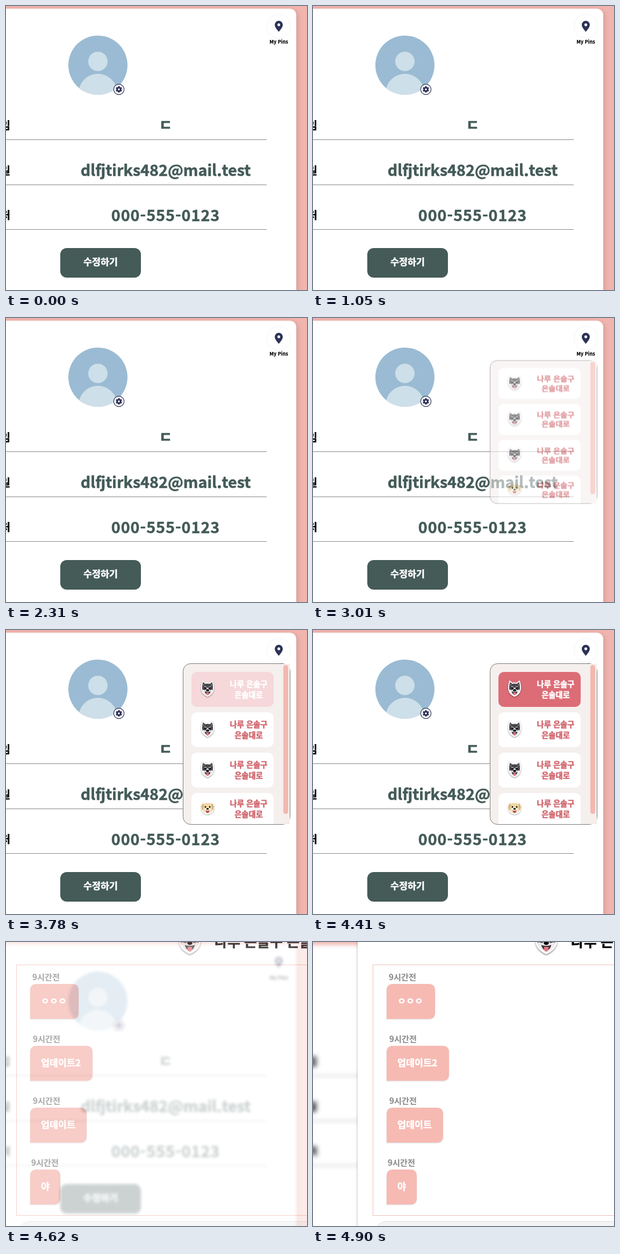
Animation of 560x528 px, one loop 6230 ms. Source, as an HTML page:

```html
<!DOCTYPE html>
<html lang="ko">
<head>
<meta charset="utf-8">
<title>My Pins</title>
<style>
  html, body { margin: 0; width: 100%; height: 100%; overflow: hidden; background: #f2b5ae; }
  svg { display: block; width: 560px; height: 528px; overflow: hidden; }
  text {
    font: 700 16px "Noto Sans CJK KR", "Noto Sans CJK", "Noto Sans", sans-serif;
    fill: currentColor; stroke: currentColor; stroke-width: .5px; stroke-linejoin: round;
  }
  .mid { text-anchor: middle; }
  .end { text-anchor: end; }
  .heavy { font-weight: 900; }
  .value { color: #445b58; font-size: 28.7px; stroke-width: .6px; }
  .label { color: #000; font-size: 19px; font-weight: 900; }
  .address { color: #d1646c; font-size: 14.3px; }
  .time { color: #8f8f8f; font-size: 15.2px; stroke-width: .2px; }
  .bubble { color: #fff; font-size: 17.4px; font-weight: 900; }

  .profile, .list, .chat, .tint, .picked { animation: 6230ms step-end infinite; }
  .profile { animation-name: blur; }
  .list { animation-name: list; transform-origin: 429px 212px; }
  .chat { animation-name: chat; }
  .tint { animation-name: tint; }
  .picked { animation-name: picked; }

  @keyframes list {
    0%, 22.44% { opacity: 0; transform: scaleY(.725); animation-timing-function: steps(5, start); }
    28.06%, 34.8% { opacity: 1; transform: none; animation-timing-function: steps(3, start); }
    38.17%, 46.03% { opacity: 0; transform: scaleY(.725); animation-timing-function: steps(5, start); }
    51.65%, 71.88% { opacity: 1; transform: none; animation-timing-function: steps(3, start); }
    75.25%, 100% { opacity: 0; transform: scaleY(.725); }
  }
  @keyframes tint {
    0% { opacity: 0; }
    60.64% { opacity: .27; }
    61.76% { opacity: .68; }
    62.89% { opacity: .9; }
    64.01%, 100% { opacity: 1; }
  }
  @keyframes picked {
    0% { color: #d1646c; }
    60.64%, 100% { color: #fff; }
  }
  @keyframes blur {
    0% { filter: none; }
    71.88% { filter: blur(1px); }
    73% { filter: blur(2px); }
    74.12% { filter: blur(2.5px); }
    75.25% { filter: blur(3px); }
    76.37%, 100% { filter: blur(4px); }
  }
  @keyframes chat {
    0% { opacity: 0; transform: translateX(-340px); }
    71.88% { opacity: .2; transform: translateX(-272px); }
    73% { opacity: .47; transform: translateX(-180px); }
    74.12% { opacity: .73; transform: translateX(-92px); }
    75.25% { opacity: .9; transform: translateX(-34px); }
    76.37% { opacity: 1; transform: translateX(-10px); }
    77.49% { opacity: 1; transform: translateX(-3px); }
    78.62%, 100% { opacity: 1; transform: none; }
  }
</style>
</head>
<body>
<svg viewBox="0 0 560 528">
  <defs>
    <clipPath id="avatarClip"><circle cx="171" cy="110" r="55"/></clipPath>
    <clipPath id="listClip"><rect x="330" y="63" width="198" height="298" rx="13"/></clipPath>
    <g id="husky">
      <path d="M-9-14L-4-10Q0-11 4-10L9-14Q12-5 10.500 3Q9 10 0 14Q-9 10-10.500 3Q-12-5-9-14Z"
        fill="#48474d" stroke="#fff" stroke-width="2" stroke-linejoin="round" style="filter:drop-shadow(0 1px 1px #0007)"/>
      <path d="M-10 3Q-8 1-5 3Q-2 2 0-3Q2 2 5 3Q8 1 10 3Q8 10 0 13Q-8 10-10 3Z" fill="#eeebea"/>
      <path d="M-8-10L-6-7L-8-5ZM8-10L6-7L8-5Z" fill="#8c7f82"/>
      <path d="M-6-4L-2-2.500M6-4L2-2.500" stroke="#eeebea" stroke-width="1.300"/>
      <circle cx="-4.300" cy="-1.200" r="1.500"/><circle cx="4.300" cy="-1.200" r="1.500"/>
      <ellipse cy="3" rx="2.800" ry="2"/>
      <path d="M-5.500 5Q0 7 5.500 5Q4.500 10 0 11.500Q-4.500 10-5.500 5Z" fill="#39313a"/>
      <path d="M-2.500 7H2.500Q3 12 0 12Q-3 12-2.500 7Z" fill="#e5727e"/>
    </g>
    <g id="retriever">
      <path d="M-8-9Q0-12 8-9Q13-7 11 3Q8 10 0 11Q-8 10-11 3Q-13-7-8-9Z"
        fill="#f0d9a8" stroke="#fff" stroke-width="2" style="filter:drop-shadow(0 1px 1px #0005)"/>
      <path d="M-8-9Q-14-5-10 5Q-7 1-7-6ZM8-9Q14-5 10 5Q7 1 7-6Z" fill="#d9b679"/>
      <ellipse cy="4" rx="6" ry="5" fill="#fbf0d8"/>
      <circle cx="-4" cy="-2" r="1.400"/><circle cx="4" cy="-2" r="1.400"/>
      <ellipse cy="1.500" rx="2.300" ry="1.600"/>
      <path d="M-4 4Q0 6 4 4Q3 9 0 9Q-3 9-4 4Z" fill="#b84b50"/>
    </g>
  </defs>

  <g class="profile">
    <rect x="-40" y="-40" width="640" height="608" fill="#f2b5ae"/>
    <rect x="-60" y="5" width="600" height="600" rx="12" fill="#fff" style="filter:drop-shadow(3px 3px 5px #0002)"/>

    <circle cx="507.500" cy="37.500" r="22" fill="#fff" stroke="#f3f3f3"/>
    <path d="M507.500 48Q500 39.500 500 35A7.500 7.500 0 0 1 515 35Q515 39.500 507.500 48ZM507.500 32.300a2.700 2.700 0 1 0 .01 0Z" fill="#2d3257"/>
    <text class="mid" x="507.500" y="70" style="font-size:9px;stroke-width:.2px">My Pins</text>

    <circle cx="171" cy="110" r="55" fill="#9abbd3"/>
    <g fill="#cddfe9" clip-path="url(#avatarClip)">
      <circle cx="171" cy="103" r="18"/>
      <ellipse cx="171" cy="162" rx="36" ry="36"/>
    </g>
    <g transform="translate(210 155)" fill="none" stroke="#2d3257">
      <circle r="9.700" fill="#fff" stroke-width="1.200"/>
      <circle r="3.300" stroke-width="3"/>
      <path d="M0-6V-4M0 6V4M5.200-3L3.500-2M-5.200 3L-3.500 2M5.200 3L3.500 2M-5.200-3L-3.500-2" stroke-width="2.800"/>
    </g>

    <path d="M-40 248.500H485M-40 332.500H485M-40 415.500H485" stroke="#858585"/>
    <text class="label end" x="8" y="229">닉네임</text>
    <text class="label end" x="8" y="313">이메일</text>
    <text class="label end" x="8" y="396">연락처</text>
    <text class="value mid heavy" x="297" y="231" style="font-size:26px;stroke-width:1.200px">ㄷ</text>
    <text class="value mid" x="297" y="316">dlfjtirks482@mail.test</text>
    <text class="value mid" x="297" y="400" style="letter-spacing:1px">000-555-0123</text>

    <rect x="101" y="450" width="150" height="55" rx="12" fill="#445b58"/>
    <text class="mid heavy" x="176" y="482" color="#fff" style="font-size:17.400px">수정하기</text>
  </g>

  <g class="list">
    <rect x="329.500" y="62.500" width="199" height="299" rx="14" fill="#f5efed" stroke="#777"/>
    <g id="cards" clip-path="url(#listClip)"></g>
    <rect x="515" y="63" width="13" height="298" fill="#f5eeeb"/>
    <rect x="516" y="65" width="9" height="277" rx="4.500" fill="#f3b8b0"/>
  </g>

  <g class="chat">
    <rect x="83" y="-20" width="900" height="570" fill="#fff" style="filter:drop-shadow(0 0 2px #0005)"/>
    <use href="#husky" transform="translate(434 -3) scale(1.700)"/>
    <text class="heavy" x="480" y="8.500" style="font-size:26px">나루 은솔구 은솔대로</text>
    <rect x="111.500" y="42.500" width="800" height="466" fill="none" stroke="#efbfb5"/>
    <g id="bubbles"></g>
    <rect x="113" y="519.500" width="800" height="50" rx="25" fill="#f4f4f4" stroke="#dedede"/>
  </g>
</svg>
<script>
  const card = (y, i) => {
    const last = i === 3, first = i === 0;
    const shift = last ? y - 3 : y;
    const look = `class="address mid${first ? ' picked' : ''}" x="451.5"`;
    return `<rect x="345" y="${y}" width="153" height="65" rx="10" fill="#fff"/>
      ${first ? `<rect class="tint" x="345" y="${y}" width="153" height="65" rx="10" fill="#dc6c76"/>` : ''}
      <use href="#${last ? 'retriever' : 'husky'}" transform="translate(375 ${shift + 31})"/>
      <text ${look} y="${shift + 28}">나루 은솔구</text>
      <text ${look} y="${shift + 47.5}">은솔대로</text>`;
  };

  const bubble = ([message, width, timeX], i) => {
    const y = 78 + 115 * i;
    return `<text class="time" x="${timeX}" y="${y - 7.5}">9시간전</text>
      <path d="M137 ${y + 65}v-53q0-12 12-12h${width - 24}q12 0 12 12v41q0 12-12 12z"
        fill="#f6bab3" style="filter:drop-shadow(0 1px 1px #0002)"/>
      <text class="bubble" x="157" y="${y + 37.5}">${message}</text>`;
  };

  document.getElementById('cards').innerHTML = [78, 153, 228, 303].map(card).join('');
  document.getElementById('bubbles').innerHTML = [
    ['ㅇㅇㅇ', 90, 141], ['업데이트2', 116, 142], ['업데이트', 105, 142], ['야', 56, 139]
  ].map(bubble).join('');
</script>
</body>
</html>
```
